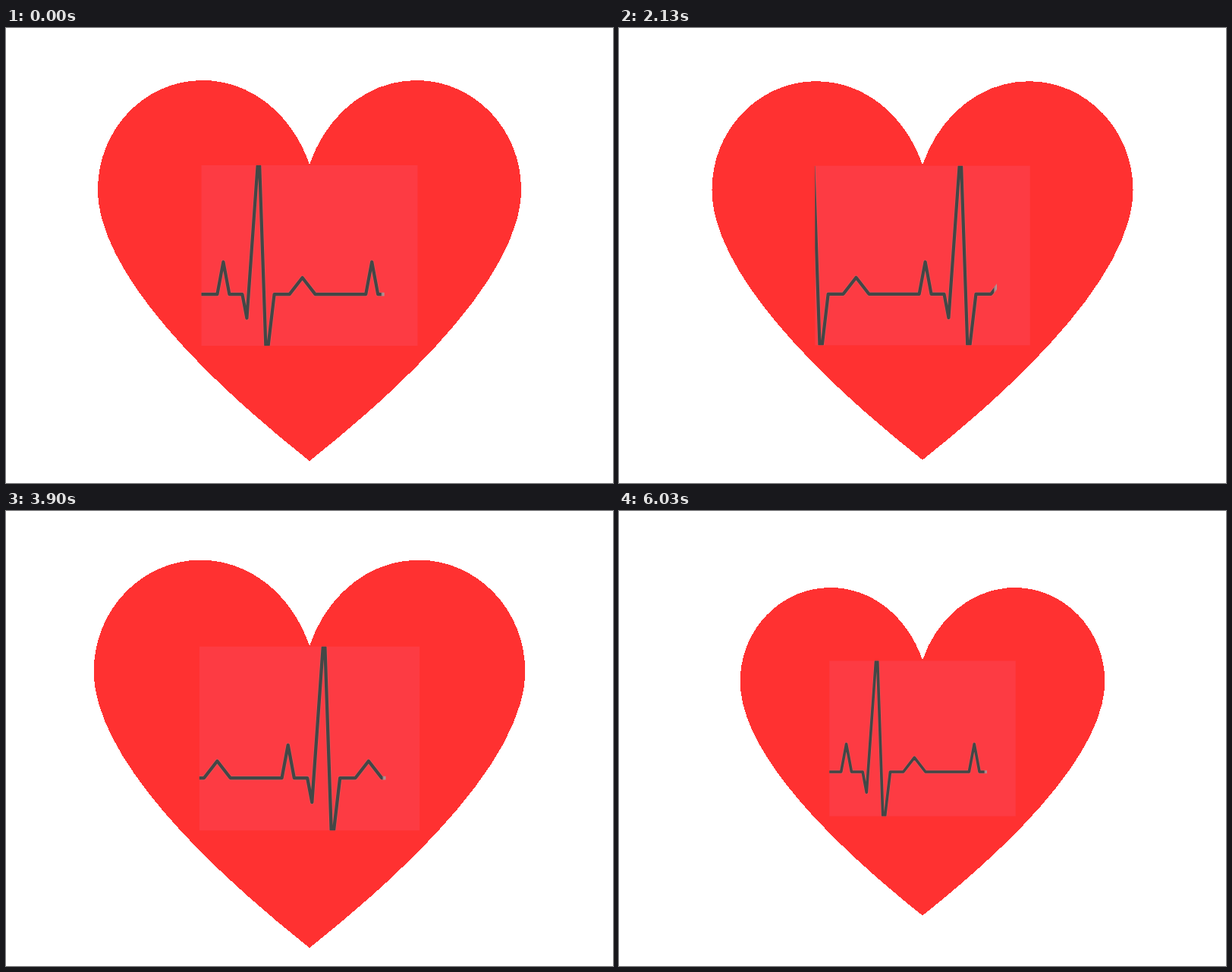
These frames come from a looping animation (800x600 px, 6060 ms). An HTML page:

```html
<!DOCTYPE html>
<html lang="en">
<head>
<meta charset="utf-8">
<title>Heartbeat</title>
<style>
  html, body { margin: 0; width: 100%; height: 100%; overflow: hidden; background: #fff; }
  svg { display: block; width: 100vw; height: 100vh; }
</style>
</head>
<body>
<svg viewBox="0 0 800 600">
  <defs>
    <clipPath id="screen"><rect x="-142.5" y="-119" width="241" height="238"/></clipPath>
    <linearGradient id="ink" gradientUnits="userSpaceOnUse" x1="94" y1="0" x2="98.5" y2="0">
      <stop offset="0" stop-color="#434746"/>
      <stop offset=".35" stop-color="#a48588"/>
      <stop offset="1" stop-color="#b79a9d"/>
    </linearGradient>
  </defs>
  <g id="heart">
    <path fill="#ff3131" shape-rendering="crispEdges" d="M0-120C-23-187-78-231-141-231C-217-231-279-166.5-279-87
      C-279 11-163 141.5 0 271C163 141.5 279 11 279-87C279-166.5 217-231 141-231C78-231 23-187 0-120Z"/>
    <rect x="-142.5" y="-119" width="285" height="238" fill="#fd3b43"/>
    <g clip-path="url(#screen)" fill="none" stroke-linejoin="round">
      <path class="trace" stroke="#b08a8a" stroke-opacity=".3" stroke-width="5.8"/>
      <path class="trace" stroke="url(#ink)" stroke-width="4.2"/>
    </g>
  </g>
</svg>
<script>
const LOOP = 6060, FRAME = 100 / 3;
const BEAT = 900, RISE = 300;
const WAVE = 195.8, SPEED = 4.287, SCROLL_FRAMES = 180.3;
const FIRST_SPIKE = -67.1, BASE = 51.1;

// One heartbeat, x measured from the tall spike.
const WAVE_POINTS = [
  [-54.5, BASE], [-46.5, 8.5], [-38.5, BASE], [-21.5, BASE], [-15.5, 82.5],
  [-1.3, -118], [1.3, -118], [9.4, 118], [12.8, 118],
  [20.7, BASE], [40.7, BASE], [57.7, 29.2], [74.7, BASE]
];

const heart = document.getElementById('heart');
const traces = document.querySelectorAll('.trace');

// Steady swell, then a decelerating release.
function beatScale(ms) {
  const phase = (ms + RISE / 2) % BEAT;
  if (phase < RISE) return 0.85 + 0.3 * phase / RISE;
  const left = 1 - (phase - RISE) / (BEAT - RISE);
  return 0.85 + 0.3 * left * left;
}

function tracePath(frame) {
  const shift = (SPEED * (frame % SCROLL_FRAMES)) % WAVE;
  const points = [];
  for (let k = -1; k <= 2; k++) {
    const spike = FIRST_SPIKE - shift + k * WAVE;
    for (const [x, y] of WAVE_POINTS) points.push((spike + x).toFixed(2) + ' ' + y);
  }
  return 'M' + points.join('L');
}

function draw(ms) {
  const tick = Math.floor((ms % LOOP) / 10) * 10;
  const frame = Math.floor((tick + 3.4) / FRAME);
  heart.setAttribute('transform', `translate(400 300) scale(${beatScale(frame * FRAME).toFixed(5)})`);
  const d = tracePath(frame);
  traces.forEach(trace => trace.setAttribute('d', d));
}

const start = performance.now();
function loop() {
  draw(performance.now() - start);
  requestAnimationFrame(loop);
}
loop();
</script>
</body>
</html>
```
